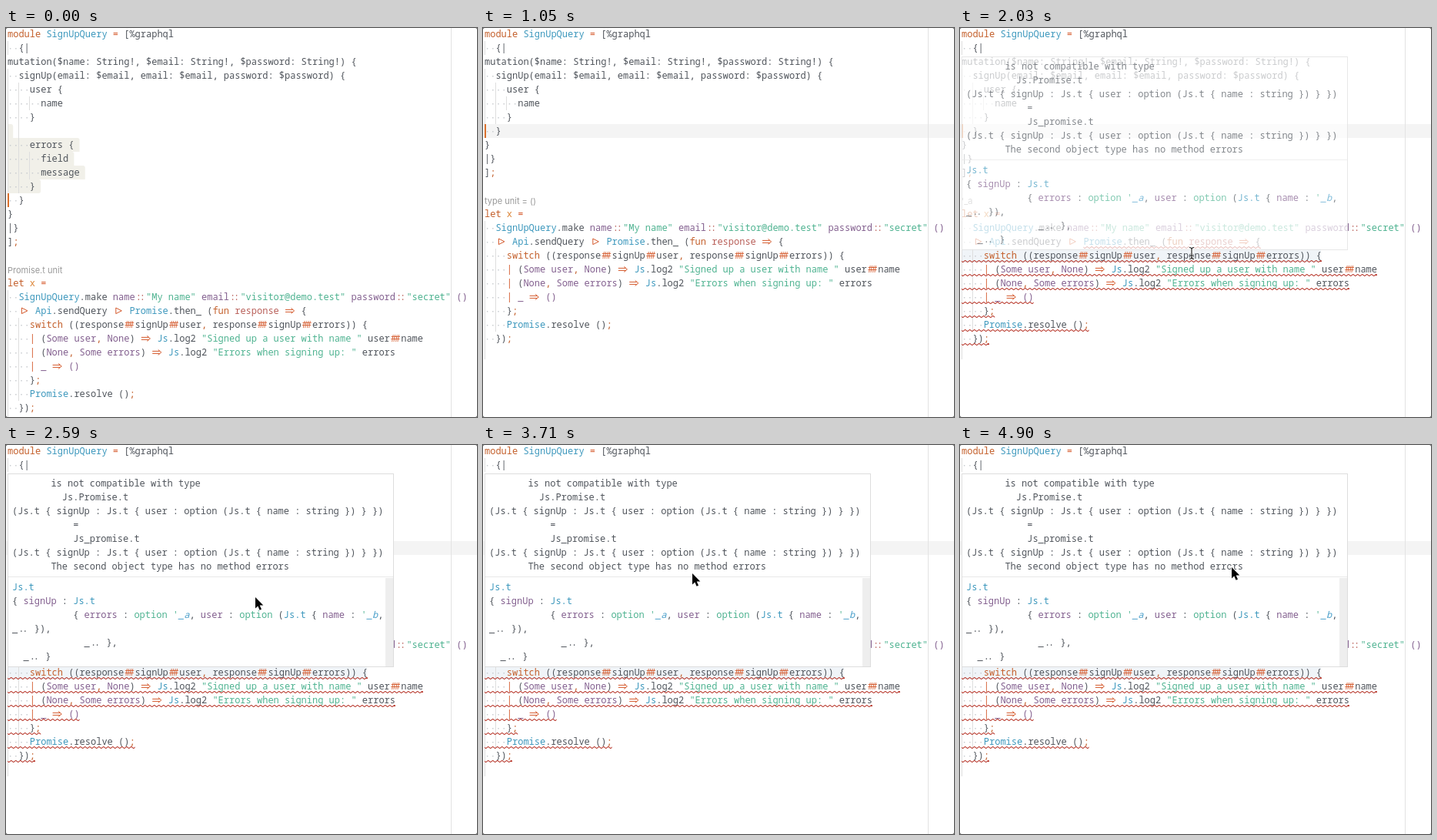
Recreate the animation shown at these times as an HTML page with a canvas. Size 612 px wide and 506 px high, loop 4.97 s.

```html
<!DOCTYPE html>
<html>
<head>
<meta charset="utf-8">
<style>
html, body { margin: 0; height: 100%; overflow: hidden; background: #fff; }
canvas { display: block; }
</style>
</head>
<body>
<canvas id="stage" width="612" height="506"></canvas>
<script>
const ctx = document.getElementById('stage').getContext('2d');
const W = 612, H = 506, CELL = 7.2, ROW = 18, LEFT = 2, LOOP = 4970, STEP = 70;
const DELETED = 560, LENS = 840, CHECKED = 1120, HOVER = 1960, SCROLLBAR = 2240, BLINK = 500;
const MONO = '12px "Noto Sans Mono", monospace';

// "~x" switches to colour x
const COLORS = {
  t: '#50555c', k: '#c4602c', b: '#3d98bd', g: '#4fb391', p: '#83608f',
  o: '#d4582a', x: '#dc8537', r: '#b9605a', i: '#4a9fca'
};

const query = `~kmodule ~bSignUpQuery ~o= ~t[%graphql
  {|
mutation($name: String!, $email: String!, $password: String!) {
  signUp(email: $email, email: $email, password: $password) {
    user {
      name
    }`.split('\n');
const errors = `
    errors {
      field
      message
    }`.split('\n');
const rest = `  }
}
|}
]~k;


~klet ~xx ~o=
  ~bSignUpQuery~t.make ~pname~r::~g"My name" ~pemail~r::~g"visitor@demo.test" ~ppassword~r::~g"secret" ~p()
  ~o|> ~bApi~t.sendQuery ~o|> ~bPromise~t.then_ (~kfun ~rresponse ~o=> ~t{
    ~kswitch ~t((response~o##~tsignUp~o##~tuser~k, ~tresponse~o##~tsignUp~o##~terrors)) {
    ~o| ~t(~pSome user~k, ~pNone~t) ~o=> ~bJs~t.log2 ~g"Signed up a user with name " ~tuser~o##~tname
    ~o| ~t(~pNone~k, ~pSome errors~t) ~o=> ~bJs~t.log2 ~g"Errors when signing up: " ~terrors
    ~o| ~p_ ~o=> ~p()
    ~t}~k;
    ~bPromise~t.resolve ()~k;
  ~t})~k;
`.split('\n');
const message = `       is not compatible with type
         Js.Promise.t
(Js.t { signUp : Js.t { user : option (Js.t { name : string }) } })
           =
           Js_promise.t
(Js.t { signUp : Js.t { user : option (Js.t { name : string }) } })
       The second object type has no method errors`.split('\n');
const signature = `~bJs.t
~t{ ~psignUp ~t: ~bJs.t
           ~t{ ~perrors ~t: ~goption '~i_a~t, ~puser ~t: ~goption ~t(~bJs.t ~t{ ~pname ~t: ~g'~i_b~t,
_.. }),
             _.. },
  _.. }`.split('\n');

const before = [...query, ...errors, ...rest], after = [...query, ...rest];
const plain = s => s.replace(/~./g, '');
const indentOf = s => s.match(/^ */)[0].length;
const colX = col => LEFT + col * CELL;

function rect(color, x, y, w, h) {
  ctx.fillStyle = color;
  ctx.fillRect(x, y, w, h);
}

function polyline(points) {
  ctx.beginPath();
  points.forEach(([x, y]) => ctx.lineTo(x, y));
}

function ligature(s, x, y) {
  if (s === '=>') {
    polyline([[x + 1, y - 5.6], [x + 10.5, y - 5.6]]);
    ctx.stroke();
    polyline([[x + 1, y - 2.6], [x + 10.5, y - 2.6]]);
    ctx.stroke();
    polyline([[x + 8.5, y - 7.6], [x + 12.6, y - 4.1], [x + 8.5, y - .6]]);
    ctx.stroke();
  } else if (s === '|>') {
    polyline([[x + 4, y - 8], [x + 11.5, y - 4.2], [x + 4, y - .4]]);
    ctx.closePath();
    ctx.stroke();
  } else {
    ctx.fillText(s[0], x + 1.1, y);
    ctx.fillText(s[1], x + CELL - 1.1, y);
  }
}

function codeLine(line, x, y) {
  ctx.lineWidth = 1;
  for (const part of ('~t' + line).split('~').slice(1)) {
    ctx.fillStyle = ctx.strokeStyle = COLORS[part[0]];
    ctx.font = (part[0] === 'i' ? 'italic ' : '') + MONO;
    for (const s of part.slice(1).match(/=>|\|>|##|::|\.\.|./g) || []) {
      if (s.length > 1) ligature(s, x, y);
      else if (s !== ' ') ctx.fillText(s, x, y);
      x += s.length * CELL;
    }
  }
}

function editor(lines) {
  lines.forEach((line, i) => {
    const top = i * ROW - 1, indent = indentOf(line);
    const next = i + 1 < lines.length ? indentOf(lines[i + 1]) : 2;
    for (let c = 0; c < (line ? indent : next); c += 2)
      rect('#dedede', Math.floor(colX(c)), top, 1, ROW);
    for (let c = 0; c < indent; c++) rect('#c9ccd0', colX(c) + 2.9, top + 9, 1.5, 1.5);
    codeLine(line, LEFT, i * ROW + 12);
  });
}

function selection() {
  ctx.fillStyle = '#f1f0e9';
  errors.forEach((line, i) => {
    ctx.beginPath();
    ctx.roundRect(LEFT, (i + 7) * ROW - 1, (line.length + 1) * CELL, ROW, [0, 3, i === 4 ? 3 : 0, 0]);
    ctx.fill();
  });
}

// zigzag with a 6 px period along the bottom 3 px of each row
function squiggles() {
  ctx.strokeStyle = '#b93a2e';
  ctx.lineWidth = 1.1;
  for (let row = 15; row < 23; row++) {
    const end = colX(plain(after[row]).length), points = [];
    const begin = row === 15 ? colX(22) : LEFT;
    for (let x = begin - 1.25, low = false; x < end + 3; x += 3, low = !low)
      points.push([x, row * ROW + (low ? 16.6 : 14.4)]);
    ctx.save();
    ctx.beginPath();
    ctx.rect(begin, row * ROW + 14, end - begin, 3);
    ctx.clip();
    polyline(points);
    ctx.stroke();
    ctx.restore();
  }
}

function popup(t) {
  ctx.globalAlpha = Math.min(1, (t - HOVER) / 100);
  rect('#fff', 2, 38, 502, 251);
  ctx.strokeStyle = '#dddddd';
  ctx.lineWidth = 1;
  ctx.strokeRect(2.5, 37.5, 501, 251);
  rect('#e9e9e9', 3, 171, 500, 1);
  if (t >= SCROLLBAR) rect('#eeeeee', 493, 173, 10, 115);
  message.forEach((line, i) => codeLine(line, 8, 54 + i * ROW));
  signature.forEach((line, i) => codeLine(line, 8, 189 + i * ROW));
  ctx.globalAlpha = 1;
}

// time, x, y
const path = [
  [1400, 325, 316], [1610, 301, 293], [2170, 301, 293], [2520, 324, 198],
  [2940, 324, 198], [3640, 272, 167], [3920, 272, 167], [4760, 353, 159], [LOOP, 353, 159]
];

function pointer(t) {
  const i = path.findIndex(p => p[0] > t);
  if (i < 1) return;
  const [t0, x0, y0] = path[i - 1], [t1, x1, y1] = path[i];
  const u = (t - t0) / (t1 - t0), e = u * u * (3 - 2 * u);
  const x = x0 + (x1 - x0) * e, y = y0 + (y1 - y0) * e;
  ctx.save();
  ctx.translate(x, y);
  ctx.strokeStyle = '#fff';
  ctx.lineWidth = 2;
  if (y < 289) {
    polyline([[0, 0], [0, 14.5], [3.3, 11.4], [5.6, 16.8], [8, 15.8], [5.7, 10.5], [10.3, 10.5]]);
    ctx.closePath();
    ctx.stroke();
    ctx.fillStyle = '#000';
    ctx.fill();
  } else {
    const beam = new Path2D('M-3-7.5Q0-7.5 0-5Q0-7.5 3-7.5M0-5V5M-3 7.5Q0 7.5 0 5Q0 7.5 3 7.5M-2 3H2');
    ctx.lineWidth = 3;
    ctx.stroke(beam);
    ctx.strokeStyle = '#222';
    ctx.lineWidth = 1.2;
    ctx.stroke(beam);
  }
  ctx.restore();
}

function draw(t) {
  const deleted = t >= DELETED, cursorRow = deleted ? 7 : 12;
  rect('#fff', 0, 0, W, H);
  if (deleted) rect('#f4f4f4', 0, 125, W, ROW);
  else selection();
  if (t >= HOVER) rect('#f0f4f8', LEFT, 287, 467, ROW);
  rect('#e3e3e3', 578, 0, 1, H);
  editor(deleted ? after : before);

  ctx.font = '11px Inter, sans-serif';
  ctx.fillStyle = '#999';
  const lens = t < LENS ? 'Promise.t unit' : t < CHECKED ? 'type unit = ()' : "'_a";
  ctx.fillText(lens, LEFT, (deleted ? 12 : 17) * ROW + 13);

  const cursorOn = !deleted || Math.floor((t - DELETED) / BLINK) % 2 === 0;
  if (cursorOn) rect('#d9702c', 2, cursorRow * ROW - 1, 2, ROW);
  if (t >= CHECKED) squiggles();
  if (t >= HOVER) popup(t);
  pointer(t);

  ctx.beginPath();
  ctx.rect(0, 0, W, H);
  ctx.roundRect(0, 0, W, H, 2);
  ctx.fillStyle = '#444';
  ctx.fill('evenodd');
}

const start = performance.now();
function frame() {
  const t = (performance.now() - start) % LOOP;
  draw(Math.floor(t / STEP) * STEP);
  requestAnimationFrame(frame);
}
frame();
</script>
</body>
</html>
```
